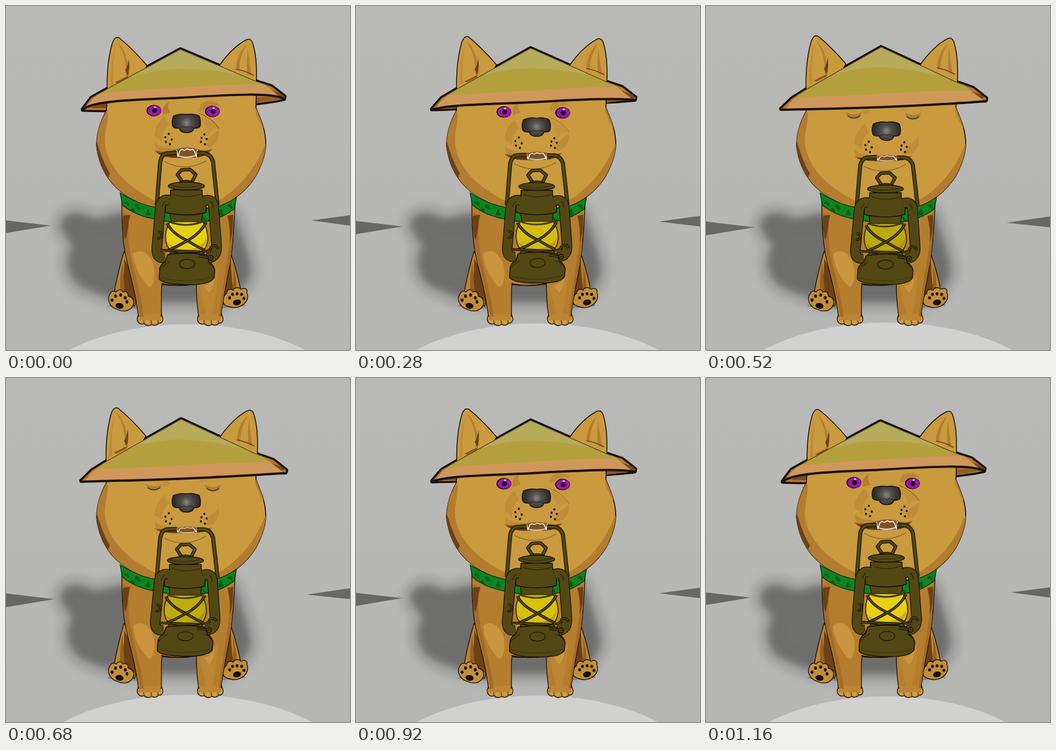
Recreate the animation shown at these times as an HTML page with a canvas. Size 600x600 px, loop 1.2 s.

```html
<!DOCTYPE html>
<html lang="en">
<head>
<meta charset="utf-8">
<title>Dog with lantern</title>
<style>
html, body { margin: 0; width: 100%; height: 100%; overflow: hidden; background: #b8b8b7; }
canvas { display: block; width: 100vw; height: 100vh; }
</style>
</head>
<body>
<canvas id="stage" width="600" height="600"></canvas>
<script>
const ctx = document.getElementById('stage').getContext('2d');
const LOOP = 1200, STEP = 40, SWAY = 1160;
const INK = '#150d06', FUR = '#c99a3e', COAT = '#b57e2e', LIT = '#c9963f', SHADE = '#b37c2f', DEEP = '#6c4116';
const METAL = '#534813', METAL_DARK = '#463c10', EDGE = '#15110a';
let p = 0; // 0 = head up, 1 = head down

const mix = (a, b) => +(a + (b - a) * p).toFixed(2);
const clamp = v => Math.max(0, Math.min(1, v));

function draw(path, fill, line, width = 1.3) {
  const shape = typeof path === 'string' ? new Path2D(path) : path;
  if (fill) { ctx.fillStyle = fill; ctx.fill(shape); }
  if (line) { ctx.strokeStyle = line; ctx.lineWidth = width; ctx.stroke(shape); }
}

function oval(x, y, rx, ry, fill, line, width, turn = 0) {
  const shape = new Path2D();
  shape.ellipse(x, y, rx, ry, turn, 0, Math.PI * 2);
  draw(shape, fill, line, width);
}

function tube(path, width, color = METAL) {
  draw(path, null, EDGE, width + 2.4);
  draw(path, null, color, width);
}

function group(paint, dx = 0, dy = 0, clip) {
  ctx.save();
  ctx.translate(dx, dy);
  if (clip) ctx.clip(new Path2D(clip));
  paint();
  ctx.restore();
}

function backdrop() {
  const wall = ctx.createLinearGradient(0, 0, 0, 600);
  wall.addColorStop(0, '#b9b9b8');
  wall.addColorStop(1, '#b6b6b5');
  ctx.fillStyle = wall;
  ctx.fillRect(0, 0, 600, 600);
  draw(`M0 ${mix(374, 376)}L${mix(78, 85)} ${mix(383, 386)}L0 ${mix(396, 400)}Z`, '#676766');
  draw(`M600 ${mix(365, 367)}L${mix(532, 524)} ${mix(374, 378)}L600 ${mix(383, 386)}Z`, '#676766');

  // soft shadow: wide penumbra around a darker core
  const shade = 'M205 366C180 368 162 380 144 372C126 362 104 364 100 380C99 396 120 406 119 422C106 448 112 478 144 490C168 500 190 508 220 512L375 512C400 500 424 482 421 455C417 430 406 400 394 365Z';
  ctx.save();
  ctx.filter = 'blur(7px)';
  ctx.globalAlpha = 0.32;
  draw(shade, '#757574', '#757574', 42);
  ctx.filter = 'blur(6px)';
  ctx.globalAlpha = 0.92;
  draw(shade, '#6b6b6a', '#6b6b6a', 5);
  ctx.restore();
  draw('M176 524Q190 512 230 514L380 514Q412 512 418 523L378 527L335 514L272 514L226 528Z', '#858584');
  oval(mix(316, 317), mix(720, 719), mix(300, 310), mix(165, 167), '#d1d1cf');
}

function hindLeg(side) {
  if (side < 0) {
    draw('M206 428C199 450 193 476 188 503L224 524L240 470Z', '#b9832f', INK);
    draw('M206 440C207 462 203 482 204 498L226 516L226 480Z', DEEP);
    draw('M203 448Q198 470 199 495L207 499Q205 470 203 448Z', '#945f22');
    draw('M182 501C186 495 190 498 192 499C196 493 202 494 204 499C210 496 214 501 213 506C222 508 226 516 220 525C213 534 201 533 194 529C184 527 177 516 179 507Z', '#c28e39', INK);
    [[185, 513], [191, 506], [200, 504], [208, 509], [211, 516]].forEach(([x, y]) => oval(x, y, 2.5, 3, INK));
    oval(198, 523, 7, 5, INK, null, 0, 0.2);
  } else {
    draw('M393 434C400 455 406 477 410 499L378 520L365 465Z', '#b9832f', INK);
    draw('M392 442Q393 470 396 492L380 514L378 480Z', DEEP);
    draw('M395 450Q402 470 402 492L395 496Q398 470 395 450Z', '#945f22');
    draw('M385 501C385 495 392 492 396 496C398 490 406 490 410 494C416 490 422 494 420 500C424 508 420 518 410 523C400 529 387 525 381 521C376 515 379 506 385 501Z', '#c28e39', INK);
    [[390, 509], [395, 503], [403, 502], [411, 503], [415, 510]].forEach(([x, y]) => oval(x, y, 2.5, 2.8, INK));
    oval(403, 517, 7, 5, INK, null, 0, -0.2);
  }
}

function foot(x) {
  draw(`M${x} 541C${x - 4} 550 ${x + 3} 557 ${x + 11} 554C${x + 15} 559 ${x + 22} 558 ${x + 24} 555C${x + 28} 558 ${x + 34} 557 ${x + 36} 553C${x + 42} 554 ${x + 46} 548 ${x + 42} 540L${x + 38} 528L${x + 4} 528Z`, '#c28e39', INK);
  [[6, 549], [17, 551], [29, 551], [39, 547]].forEach(([dx, y]) => oval(x + dx, y, 3.5, 4.5, '#cf9d48'));
  [11, 24, 36].forEach(dx => draw(`M${x + dx} 554Q${x + dx - 2} 548 ${x + dx} 542`, null, '#54330f', 1.1));
}

function body() {
  hindLeg(-1);
  hindLeg(1);
  foot(230);
  foot(335);
  draw('M202 340C202 370 203 400 207 426C213 460 225 490 231 541L271 541C272 520 270 500 272 486Q300 489 332 485C332 505 333 520 336 541L375 541C379 505 389 465 393 433C397 405 398 370 400 340Z', COAT, INK);
  draw('M232 537L270 537L269 548L233 548Z', '#bb8534');
  draw('M337 537L374 537L376 548L337 548Z', '#bb8534');
  draw('M204 360C204 390 207 420 211 438C220 470 229 505 234 542L240 542C236 500 221 460 215 420C212 400 214 380 217 366Z', '#a36b28');
  draw('M204 366L217 364C211 380 215 390 208 408C204 398 203 380 204 366Z', DEEP);
  draw('M396 362Q393 390 389 420Q380 480 371 541L374 541Q382 490 392 440Q397 400 396 362Z', '#a36b28');
  draw('M396 364L386 366Q392 388 390 412Q397 395 396 364Z', DEEP);
  draw('M222 432C235 422 252 430 258 455C261 475 256 490 250 490C238 480 222 455 222 432Z', LIT);
  draw('M336 480Q352 492 364 470Q370 460 371 450Q369 500 359 540L350 540Q342 510 336 480Z', '#bb8534');
  draw('M345 488Q358 486 364 470Q363 492 354 500Z', LIT);
  draw('M271 484Q300 491 333 484', null, INK, 1.5);
}

function collar() {
  const band = 'M199 326Q235 348 264 351L300 356L365 350Q390 345 403 329L398 354Q380 368 357 374Q310 383 262 372Q225 366 203 347Z';
  draw(band, '#0d841f', '#0b2b0e', 1.3);
  group(() => {
    [[210, 343], [229, 350], [247, 360], [220, 356], [345, 371], [374, 360], [390, 348]].forEach(([x, y], i) => {
      oval(x, y, 4 + i % 3, 2 + i % 2, '#0a5c1b', null, 0, i);
      oval(x + 3, y + 3, 2, 3, '#0a5c1b', null, 0, i * 2);
    });
  }, 0, 0, band);
}

function ears() {
  group(() => {
    draw('M177 158C175 125 178 92 185 66Q190 51 198 56C214 69 229 84 246 104L215 158Z', FUR, INK, 1.5);
    draw('M182 140Q181 100 192 66Q184 100 187 137Z', '#bd8936');
    draw('M194 63C205 72 213 90 215 119L209 122C211 100 205 80 194 63Z', SHADE);
    draw('M214 92Q217 108 212 122L208 112Q213 104 214 92Z', DEEP);
    draw('M190 133Q202 127 214 121L212 126L194 135Z', '#8a5720');
  }, mix(0, -2), mix(0, -3));
  group(() => {
    draw('M372 104C386 84 402 68 419 59Q428 55 431 67C437 88 438 110 436 150L395 150Z', FUR, INK, 1.5);
    draw('M421 66C407 78 402 94 401 110L407 113Q406 90 421 66Z', SHADE);
    draw('M422 75Q419 95 421 119L428 121Q424 95 422 75Z', '#b27c30');
    draw('M401 110Q418 113 432 121', null, DEEP, 1.6);
  }, mix(0, 2), mix(0, -2));
}

const headPath = 'M177 148L175 183C164 203 158 222 158 244C161 270 170 291 185 309C204 331 234 347 264 351Q310 362 370 349C398 340 420 321 436 296C446 277 453 258 453 240C453 214 443 196 436 177L437 140';

function head() {
  draw(headPath, FUR, INK, 1.6);
  group(() => {
    draw('M174 182C184 186 170 216 173 244C180 282 208 314 263 341L263 356L200 336L145 280L145 200Z', SHADE);
    draw('M157 232C163 250 168 270 181 292L177 303Q158 277 157 232Z', DEEP);
    draw('M452 240C438 278 411 316 370 340L370 356L435 320L460 250Z', SHADE);
    draw('M434 180Q438 195 448 212L457 215L442 170Z', SHADE);
  }, 0, 0, headPath);
}

function eye(x, y, shut) {
  oval(x, y, 13, 10, '#15091a');
  oval(x + 0.8, y, 11.7, 9, '#a113b4');
  oval(x + 1, y, 4.4, 4.4, '#08040a');
  oval(x + 2, y - 6, 2, 1.6, '#d9c3df');
  if (!shut) return;
  oval(x, y, 14.5, 11, FUR);
  const drop = 7 * shut;
  if (shut < 1) oval(x, y + 7, 12, 9 * (1 - shut), '#a113b4', '#15091a', 1);
  draw(`M${x - 14} ${y - 3}Q${x} ${y + drop * 0.9} ${x + 14} ${y - 3}L${x + 12} ${y + 3}Q${x} ${y + 5 + drop} ${x - 12} ${y + 3}Z`, '#b17d33');
  draw(`M${x - 11} ${y + 4}Q${x} ${y + 5 + drop} ${x + 11} ${y + 4}`, null, '#4d443c', 2);
}

function face(shut) {
  // muzzle shading
  group(() => {
    draw('M276 192C264 204 257 219 260 229Q268 229 272 238Q271 219 284 207Z', '#bf8c38');
    draw('M353 230Q364 222 371 216Q374 230 362 242Q353 248 348 244Z', '#bf8c38');
    draw('M260 238Q270 248 284 247L298 249L270 257Q258 250 260 238Z', '#bd8937');
    ctx.globalAlpha = 1 - p;
    draw('M341 192Q356 197 371 214Q357 211 353 226Q349 206 341 201Z', '#c39039');
    draw('M336 187Q359 195 372 214', null, '#6e4718', 1);
  }, 0, mix(0, 13));
  ctx.globalAlpha = 1 - p * 0.7;
  draw('M274 190Q270 173 286 167Q279 174 287 186Z', SHADE);
  draw('M337 183Q340 166 353 166Q367 165 373 174Q355 171 348 181Z', '#b98536');
  ctx.globalAlpha = 1;

  eye(mix(258, 258), mix(182.5, 187.5), shut);
  eye(mix(360, 361), mix(184, 189), shut);

  // nose and whisker dots
  group(() => {
    const shine = ctx.createRadialGradient(315, 204, 1, 315, 204, 25);
    [[0, '#85827e'], [0.3, '#56534f'], [0.7, '#393633'], [1, '#2b2826']].forEach(s => shine.addColorStop(...s));
    draw('M292 192Q303 187 315 189Q328 187 337 192Q341 202 338 211Q334 214 328 213Q326 221 315 221Q304 221 302 213Q294 214 291 210Q288 201 292 192Z', shine, '#171310', 1.5);
    draw('M303 213Q308 209 315 212Q322 209 327 213', null, 'rgba(25,22,20,.6)', 1.2);
    [[284, 223], [278, 229], [289, 233], [279, 237], [286, 241], [346, 224], [341, 230], [350, 232], [340, 237], [347, 241]]
      .forEach(([x, y]) => oval(x, y, 1.8, 2.1, '#20130a'));
  }, 0, mix(0, 14));

  // mouth
  group(() => {
    ctx.scale(1, mix(1, 0.57));
    draw('M258 251Q272 257 296 250Q314 244 333 249Q347 255 360 249Q353 261 334 264L298 264Q272 266 258 251Z', '#8c5a24');
    draw('M262 255Q280 258 297 251L301 262L333 262L333 250Q344 256 356 251Q347 263 334 264L299 265Q274 265 262 255Z', '#613713');
    draw('M300 252Q315 246 332 252L331 261L301 261Z', '#805124');
    draw('M297 251L300 263L303 253L307 250L311 252L316 249L321 251L326 250L329 254L332 263L334 250', null, '#e5e6e6', 1.9);
    draw('M302 262Q316 266 331 261', null, '#d8dada', 2.2);
  }, 0, mix(0, 120));
  draw(`M276 ${mix(271, 280)}Q312 ${mix(291, 298)} 349 ${mix(270, 276)}`, null, '#765022', 1);
}

function hatCone() {
  return `M${mix(134, 131.5)} ${mix(180, 179)}L${mix(149, 150)} ${mix(160, 161)}L174 ${mix(146, 146)}`
    + `L${mix(304, 305.5)} ${mix(75.5, 71.5)}L435 ${mix(131, 132)}L${mix(463, 466)} ${mix(140, 143)}`
    + `L${mix(486, 489)} ${mix(158, 161)}L${mix(485, 488)} ${mix(162, 165)}`;
}

function hatRim(start) {
  return `${start}C${mix(464, 450)} ${mix(151, 170)} ${mix(400, 390)} ${mix(154, 173)} 304 ${mix(160, 177)}`
    + `C${mix(230, 225)} ${mix(164, 180)} ${mix(151, 165)} ${mix(164, 181)} ${mix(134, 131)} ${mix(181, 181)}`;
}

function hatBack() {
  const under = `${hatCone()}Q${mix(430, 445)} ${mix(174, 162)} 304 ${mix(179, 165)}Q${mix(190, 190)} ${mix(183, 173)} ${mix(134, 131)} ${mix(181, 179)}Z`;
  draw(under, null, '#17100c', 7);
  draw(under, '#b87533');
  if (p < 0.5) {
    draw('M148 178Q160 169 180 169L180 178Q160 178 148 178Z', '#7b4a1d');
    draw('M435 160Q464 156 480 162L435 169Z', '#935b25');
  }
}

function hatFront() {
  const cone = hatRim(hatCone()) + 'Z';
  draw(cone, '#b4a03d');
  group(() => {
    draw(`M172 ${mix(141, 141)}Q238 ${mix(111, 108)} 300 ${mix(110, 107)}Q370 ${mix(109, 109)} 437 ${mix(127, 130)}L304 55Z`, '#b6aa5b');
    draw(`M120 ${mix(172, 173)}L163 ${mix(153, 159)}Q245 ${mix(145, 157)} 310 ${mix(142, 153)}Q400 ${mix(135, 147)} 462 ${mix(136, 148)}L500 ${mix(151, 158)}L500 195L115 195Z`, '#cf985a');
    draw(`M125 183L146 ${mix(158, 159)}L160 ${mix(154, 157)}Q143 168 136 186Z`, '#b8762f');
    draw(`M442 ${mix(130, 131)}L468 ${mix(138, 140)}L494 160L484 165Q467 ${mix(149, 153)} 442 ${mix(130, 131)}Z`, '#b97932');
    draw(`M463 ${mix(146, 149)}L488 157L482 162Z`, '#774718');
  }, 0, 0, cone);
  draw(hatCone(), null, '#433719', 1.1);
  draw(hatRim(`M${mix(485, 488)} ${mix(162, 166)}`), null, '#1b110c', 4);
}

function lantern() {
  const top = mix(257, 264.5);
  const base = mix(347, 348);
  const arm = (x, dx) => `M${x} ${base}L${x + dx} ${top + 14}Q${x + dx * 1.5} ${top + 1} ${x + dx * 3} ${top}`;
  tube(arm(263, 6) + `L298 ${top - 1}`, 4.6);
  tube(arm(369, -8) + `L333 ${top}`, 4.6);

  ctx.save();
  ctx.transform(1, 0, mix(0, -0.006), mix(1, 0.9653), mix(0, 1.7), mix(0, 14.85));

  // hanger and chimney
  tube('M307 306L299 294L306 286L321 285L331 294L325 306', 3.5);
  draw('M302 307Q315 301 327 307L329 316L301 316Z', METAL, EDGE);
  draw('M287 321L342 321Q341 334 349 344L349 360Q314 369 278 360L278 344Q288 335 287 321Z', METAL, EDGE, 1.5);
  oval(314.5, 314, 31.5, 7, METAL, EDGE, 1.5);
  draw('M286 312Q314 321 344 311', null, '#2c270e', 1.2);
  draw('M291 328Q315 337 340 328', null, '#2b260d', 1.2);
  draw('M286 362Q315 367 343 362L341 379L289 379Z', METAL, EDGE);

  // glass
  const flame = `rgb(${mix(229, 188)},${mix(208, 167)},${mix(18, 15)})`;
  draw('M286 376Q276 392 279 411Q282 426 294 431L337 431Q350 425 352 407Q352 388 343 376Z', flame, '#42380f', 2);
  draw('M280 411Q288 426 301 429L333 429Q348 422 350 404Q340 424 314 425Q293 424 280 411Z', `rgb(${mix(205, 171)},${mix(169, 137)},14)`);
  draw('M284 376Q315 388 346 375', null, METAL_DARK, 3);

  // side tubes
  tube('M286 339Q271 335 269 352L264 413C261 434 265 441 278 439', 16);
  tube('M345 340Q360 335 362 350L367 414C369 431 364 439 350 440', 16);
  draw('M272 350L278 340M356 340Q363 346 361 352', null, '#27220c', 1.3);

  // guard wires
  tube('M281 379Q290 397 316 409Q335 421 347 426', 2.5);
  tube('M349 377Q339 397 315 410Q294 422 283 426', 2.5);
  tube('M270 426L345 429', 2);
  draw('M288 428Q315 435 344 428L349 438L282 438Z', METAL, EDGE);

  // tank
  draw('M282 434Q315 428 350 434L354 447Q362 451 364 460L363 474Q356 487 315 486Q274 486 267 476L268 458Q270 450 278 446Z', METAL, EDGE, 1.5);
  draw('M269 460Q275 451 286 446M348 446Q360 451 363 459', null, '#2b260d', 1.2);
  draw('M268 473Q315 486 362 472', null, '#3b3411', 1.2);
  oval(316, 450, 13.5, 8, METAL, '#211c0a', 1.3);
  draw('M305 456Q317 461 327 455', null, '#27210b', 1.2);

  // fittings
  tube('M344 427Q355 430 358 420Q366 414 370 424', 2);
  tube('M336 436L354 439', 2);
  oval(357, 439, 4, 4.5, METAL, EDGE, 1.5);
  oval(357, 439, 1.5, 1.8, '#27210b');
  tube('M265 394Q273 394 271 402Q268 407 264 404', 1.8);
  ctx.restore();
}

function blink(t) {
  return clamp((t - 400) / 100) * clamp((800 - t) / 100);
}

function frame(now) {
  const t = Math.floor((now % LOOP) / STEP) * STEP;
  p = (1 - Math.cos(2 * Math.PI * t / SWAY)) / 2;
  ctx.lineJoin = 'round';
  backdrop();
  body();
  collar();
  hatBack();
  ears();
  head();
  face(blink(t));
  hatFront();
  lantern();
  requestAnimationFrame(frame);
}
requestAnimationFrame(frame);
</script>
</body>
</html>
```
